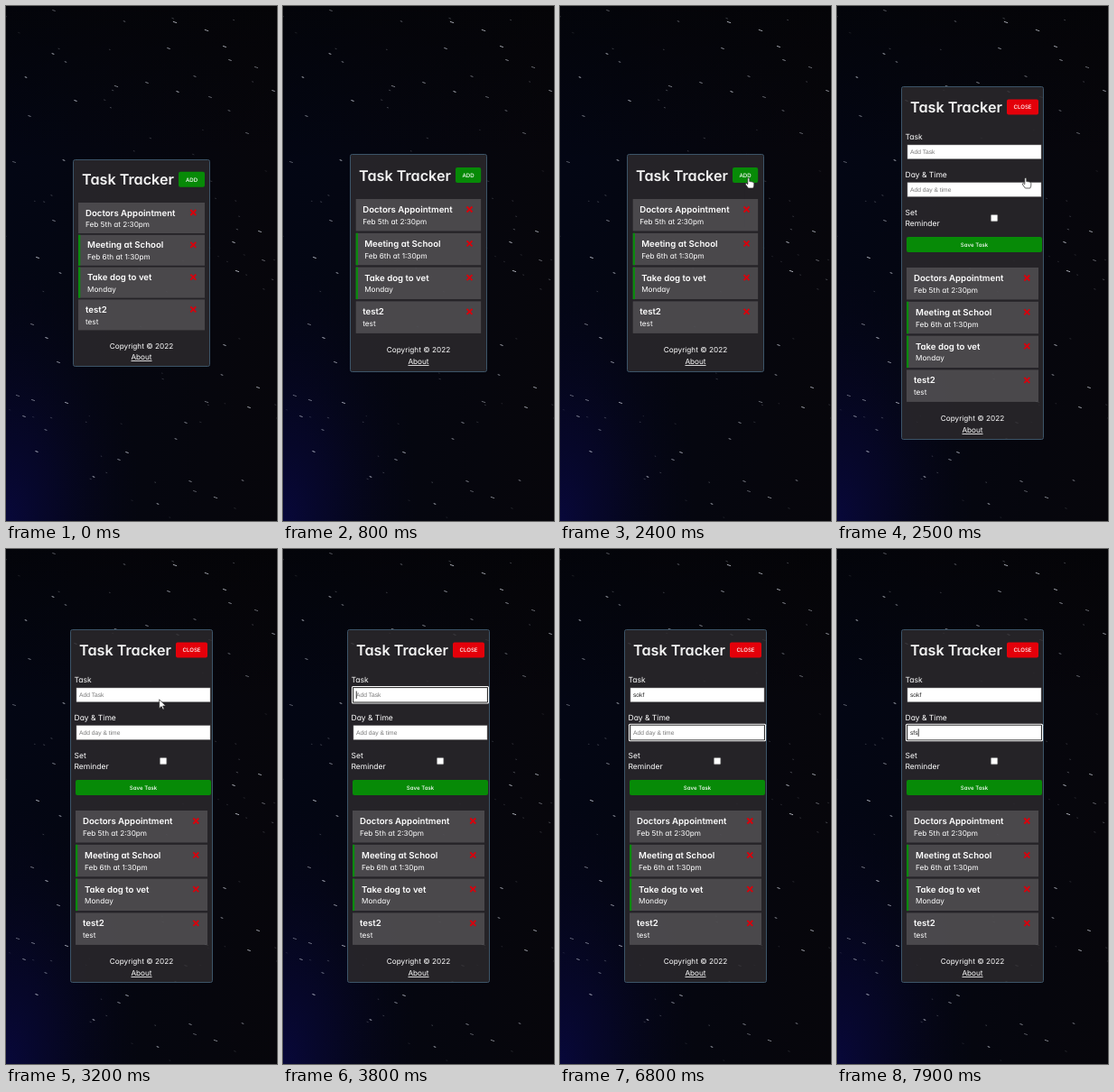
An HTML page that plays this animation: 300x571 px, repeating every 8000 ms.

```html
<!DOCTYPE html>
<html lang="en">
<head>
<meta charset="utf-8">
<title>Task Tracker</title>
<style>
html, body { margin: 0; width: 100%; height: 100%; overflow: hidden; background: #05060a; }
svg { display: block; width: 300px; height: 571px; }
text {
  font-family: Inter, "Open Sans", sans-serif; font-feature-settings: "cv11"; /* single-storey a */
  fill: #fff; text-rendering: geometricPrecision; white-space: pre;
}
.title { font-size: 16.2px; font-weight: 600; fill: #f4f4f4; }
.name { font-size: 9.65px; font-weight: 600; }
.body { font-size: 8.2px; }
.label { font-size: 8.5px; }
.button { font-size: 6.1px; font-weight: 500; }
.input { font-family: "Liberation Sans", Arial, sans-serif; font-size: 6.7px; fill: #222; }
.hint { fill: #777; }
</style>
</head>
<body>
<svg id="stage" viewBox="0 0 300 571">
  <defs>
    <linearGradient id="sky">
      <stop offset="0" stop-color="#030614"/>
      <stop offset=".5" stop-color="#05060f"/>
      <stop offset="1" stop-color="#07060b"/>
    </linearGradient>
    <linearGradient id="shade" x2="0" y2="1">
      <stop offset="0" stop-color="#040406" stop-opacity=".7"/>
      <stop offset=".3" stop-color="#040406" stop-opacity="0"/>
    </linearGradient>
    <radialGradient id="glow" cx="0" cy="1" r=".5">
      <stop offset="0" stop-color="#08083a"/>
      <stop offset=".4" stop-color="#07072c" stop-opacity=".7"/>
      <stop offset="1" stop-color="#060618" stop-opacity="0"/>
    </radialGradient>
  </defs>
  <rect width="300" height="571" fill="url(#sky)"/>
  <rect width="300" height="571" fill="url(#shade)"/>
  <rect width="300" height="571" fill="url(#glow)"/>
</svg>
<script>
const LOOP = 8000;
const stage = document.getElementById('stage');

function add(parent, tag, attrs = {}, content = '') {
  const node = document.createElementNS('http://www.w3.org/2000/svg', tag);
  for (const key in attrs) node.setAttribute(key, attrs[key]);
  node.textContent = content;
  return parent.appendChild(node);
}
const box = (g, x, y, width, height, fill, more) => add(g, 'rect', { x, y, width, height, fill, ...more });
const write = (g, x, y, cls, content, more) => add(g, 'text', { x, y, class: cls, ...more }, content);
const show = (node, on) => node.setAttribute('visibility', on ? 'visible' : 'hidden');
const middle = { 'text-anchor': 'middle' };

// Sky: a few bright streaks plus a seeded scatter of faint ones
const brightStars = [
  242,45, 52,53, 66,62, 222,27, 187,18, 131,17, 53,5, 180,47, 248,60, 209,78, 277,68, 22,79,
  77,105, 26,122, 122,89, 156,85, 190,95, 226,101, 296,94, 267,141, 247,116, 64,171, 9,173,
  53,238, 35,279, 60,296, 256,294, 285,282, 252,262, 281,250, 29,353, 45,368, 58,395, 20,455,
  30,437, 242,376, 239,409, 279,423, 269,445, 199,462, 222,439, 188,480, 134,495, 125,503,
  67,440, 13,432, 34,494, 44,470, 97,522, 168,552, 204,527, 209,538, 232,545, 262,526
];
let seed = 11;
const random = () => (seed = (seed * 16807) % 2147483647) / 2147483647;
function star(x, y, length, opacity) {
  add(stage, 'line', { x1: x - length / 2, y1: y - length / 6, x2: x + length / 2, y2: y + length / 6,
    stroke: '#e8ecf8', 'stroke-width': .9, 'stroke-linecap': 'round', opacity });
}
for (let i = 0; i < 60; i++) star(random() * 300, random() * 571, .6 + random(), .1 + random() * .2);
for (let i = 0; i < brightStars.length; i += 2)
  star(brightStars[i], brightStars[i + 1], 1.6 + random() * 2, .4 + random() * .45);

const tasks = [
  ['Doctors Appointment', 'Feb 5th at 2:30pm', false],
  ['Meeting at School', 'Feb 6th at 1:30pm', true],
  ['Take dog to vet', 'Monday', true],
  ['test2', 'test', false]
];

function panel(p) {
  const g = add(stage, 'g');
  box(g, p.x + .5, p.y + .5, 299 - 2 * p.x, p.h, '#2b292c', { 'fill-opacity': .85, stroke: '#3c5468', rx: 2 });
  write(g, p.titleX, p.titleY, 'title', 'Task Tracker');
  box(g, p.buttonX, p.buttonY, p.rowX + p.rowW - p.buttonX, 17, p.color, { rx: 2 });
  write(g, (p.buttonX + p.rowX + p.rowW) / 2, p.buttonY + 10.8, 'button', p.button, middle);
  tasks.forEach(([name, day, reminder], i) => {
    const y = p.rowY + i * p.pitch;
    const x = p.rowX + (reminder ? 10 : 8) - p.inset;
    box(g, p.rowX, y, p.rowW, p.rowH, '#fff', { 'fill-opacity': .17 });
    if (reminder) box(g, p.rowX, y, 2.3, p.rowH, '#0b8a0e');
    write(g, x, y + p.nameDy, 'name', name);
    write(g, x, y + p.nameDy + 12.8, 'body', day);
    const cx = p.rowX + p.rowW - 12.7, cy = y + p.nameDy - 3.5;
    add(g, 'path', { d: `M${cx - 3} ${cy - 3}l6 6m0-6l-6 6`, stroke: '#d8000c', 'stroke-width': 1.9 });
  });
  write(g, 150, p.footY, 'body', 'Copyright © 2022', middle);
  write(g, 150, p.footY + p.footDy, 'body', 'About', { ...middle, 'text-decoration': 'underline' });
  return g;
}

const listStart = {
  x: 74, y: 170, h: 229, titleX: 84, titleY: 197.5, button: 'ADD', color: '#078a07', buttonX: 191, buttonY: 183.7,
  rowX: 80, rowW: 140, rowY: 218, rowH: 34, pitch: 35.8, inset: 0, nameDy: 14.5, footY: 380, footDy: 12
};
const listEnd = {
  ...listStart, y: 164, h: 241, titleY: 193.5, buttonY: 179,
  rowX: 80.7, rowW: 138.5, rowY: 214, rowH: 35.5, pitch: 37.8, inset: .5, nameDy: 15, footY: 384, footDy: 13
};
const listMid = { ...listStart };
for (const key in listStart)
  if (typeof listStart[key] === 'number') listMid[key] = (listStart[key] + listEnd[key]) / 2;

const lists = [listStart, listMid, listEnd].map(panel);
const form = panel({
  ...listEnd, x: 71, y: 89, h: 391, titleX: 81, titleY: 118, button: 'CLOSE', color: '#e4000a',
  buttonX: 188, buttonY: 103.5, rowX: 77, rowW: 146, rowY: 290, inset: 0, footY: 460
});

function field(y, hint) {
  const ring = add(form, 'g');
  box(ring, 76, y - 1.5, 152, 19.5, '#fff', { rx: 1.5 });
  box(ring, 77, y - .5, 150, 17.5, '#111', { rx: 1 });
  box(form, 78, y + .5, 148, 15.5, '#fff', { stroke: '#999', 'stroke-width': .5 });
  const label = write(form, 81, y + 10.4, 'input', hint);
  const caret = box(form, 81, y + 4, .8, 8.5, '#111');
  return (value, focused, blinkOn) => {
    label.textContent = value || hint;
    label.setAttribute('class', value ? 'input' : 'input hint');
    caret.setAttribute('x', 81 + (value ? label.getComputedTextLength() + .2 : -.2));
    ring.setAttribute('display', focused ? 'inline' : 'none');
    caret.setAttribute('display', focused && blinkOn ? 'inline' : 'none');
  };
}
write(form, 75.5, 147.5, 'label', 'Task');
write(form, 75.5, 190, 'label', 'Day & Time');
write(form, 75.5, 231.5, 'label', 'Set');
write(form, 75.5, 244, 'label', 'Reminder');
box(form, 170.4, 231.4, 7.4, 7.4, '#fff', { stroke: '#777', 'stroke-width': .6, rx: 1 });
box(form, 77, 256, 150, 17, '#078a07', { rx: 2 });
write(form, 152, 266.8, 'button', 'Save Task', middle);
const taskField = field(153.5, 'Add Task');
const dayField = field(195.3, 'Add day & time');

// Pointer shapes, with the hot spot at the origin
const outline = { fill: '#fff', stroke: '#222', 'stroke-width': .7, 'stroke-linejoin': 'round' };
const arrow = add(stage, 'path', { d: 'M0 0V10L2.4 7.8L4 11.3L5.5 10.6L4 7.2H7.2Z', ...outline });
const hand = add(stage, 'path', {
  d: 'M-1 .8Q0-.6 1 .8V4.4Q2 3.6 2.8 4.7Q3.8 4 4.6 5.1Q6 4.8 6 6.2V8.5Q6 10 5 11.7H-.4L-3.4 7.6Q-3.6 6-2.2 6.4L-1 7.4Z',
  ...outline
});

const pointerPath = [[1300, 298, 300], [1700, 245, 232], [2100, 208.8, 190.3], [2700, 208.8, 190.3], [3400, 160, 161]];
const typedTask = [[0, ''], [5300, 's'], [5500, 'so'], [5600, 'sokf']];
const typedDay = [[0, ''], [7500, 's'], [7700, 'sf'], [7800, 'sfs']];
const caretSteps = [[0, true], [4200, false], [4700, true], [5200, false], [5300, true],
  [6100, false], [6300, true], [6800, false], [7300, true]];

const at = (steps, t) => steps.filter(step => step[0] <= t).pop()[1];

function pointerAt(t) {
  const i = Math.max(1, pointerPath.findIndex(point => point[0] > t));
  const [t0, x0, y0] = pointerPath[i - 1], [t1, x1, y1] = pointerPath[i];
  const k = (t - t0) / (t1 - t0), ease = k * k * (3 - 2 * k);
  return [x0 + (x1 - x0) * ease, y0 + (y1 - y0) * ease];
}

function draw(now) {
  const t = Math.floor((now % LOOP) / 100) * 100;
  const open = t >= 2500;
  const current = t < 700 ? 0 : t < 800 ? 1 : 2;
  lists.forEach((list, i) => show(list, !open && i === current));
  show(form, open);
  const blinkOn = at(caretSteps, t);
  taskField(at(typedTask, t), t >= 3500 && t < 6300, blinkOn);
  dayField(at(typedDay, t), t >= 6300, blinkOn);

  const moving = t >= 1300 && t < 3400;
  const overButton = t >= 2100 && t < 2800;
  show(arrow, moving && !overButton);
  show(hand, moving && overButton);
  if (moving) {
    const place = `translate(${pointerAt(t)})`;
    arrow.setAttribute('transform', place);
    hand.setAttribute('transform', place);
  }
}

const start = performance.now();
function tick() {
  draw(performance.now() - start);
  requestAnimationFrame(tick);
}
tick();
</script>
</body>
</html>
```
